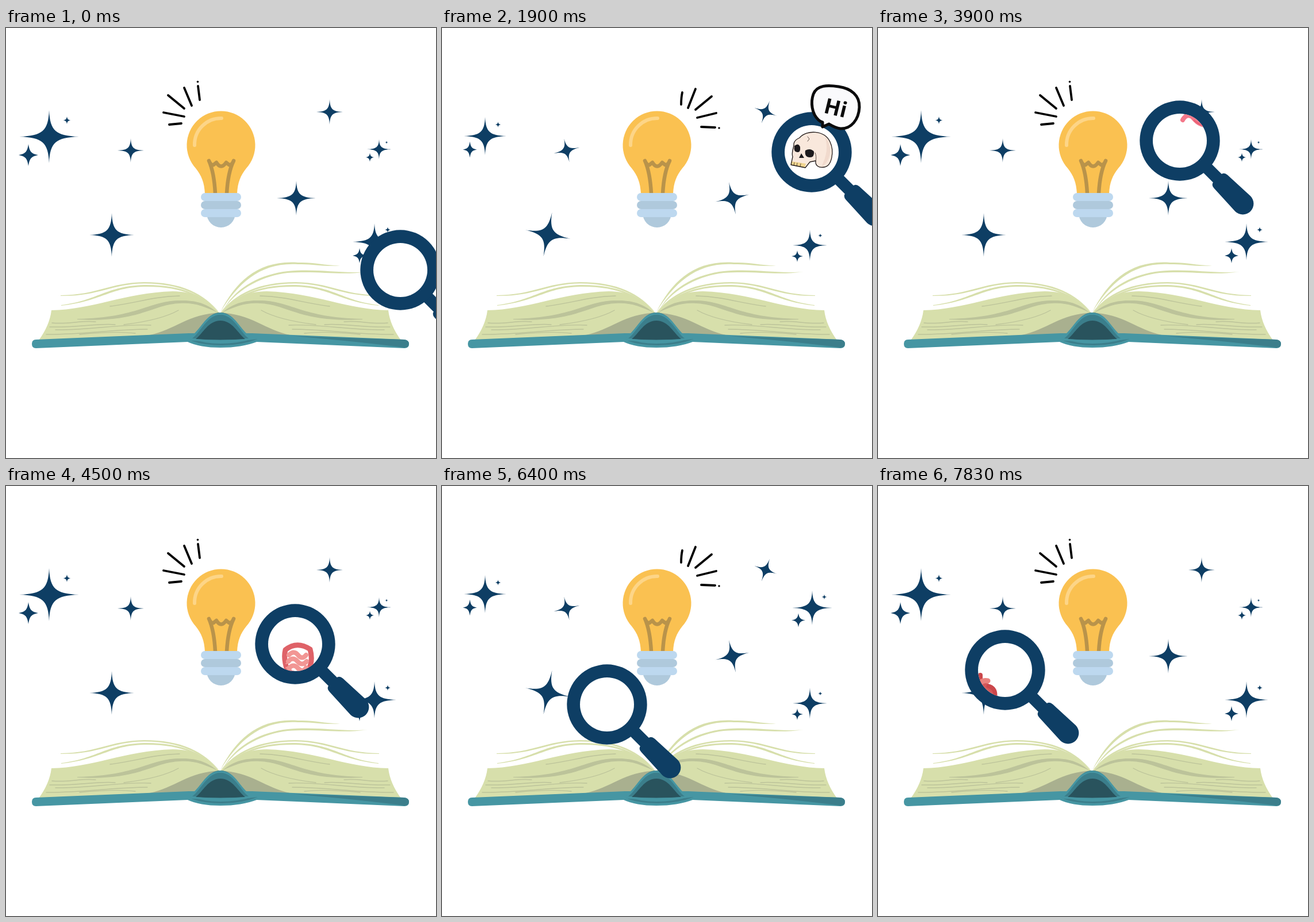
An HTML page with a canvas for the animation above (8000 ms loop, 748 px wide and 748 px high).

```html
<!DOCTYPE html>
<html lang="en">
<head>
<meta charset="utf-8">
<title>Open book and magnifying glass</title>
<style>
  html, body { margin: 0; width: 100%; height: 100%; overflow: hidden; background: #fff; }
  canvas { display: block; width: 748px; height: 748px; }
</style>
</head>
<body>
<canvas id="stage" width="748" height="748"></canvas>
<script>
const ctx = document.getElementById('stage').getContext('2d');
const LOOP = 8000;
const NAVY = '#0e3e64', PAGE = '#d7dfab', PAGE_LINE = '#bcc39a', FOLD = '#a9b08f';
const TEAL = '#4696a3', TEAL_DARK = '#3b7e8b', TEAL_DEEP = '#29535d';

// Each step: start time, lens centre x and y. The two star poses alternate per step.
const steps = [
  [0, 686, 421], [300, 668, 432], [530, 655, 373], [830, 650, 335], [1070, 648, 291],
  [1370, 645, 250], [1630, 643, 216], [1900, 643, 216], [2170, 645, 190], [2470, 638, 146],
  [2730, 622, 110], [3000, 599, 104], [3300, 567, 145], [3600, 567, 145], [3900, 525, 196],
  [4200, 510, 238], [4500, 503, 275], [4800, 503, 304], [5070, 495, 313], [5330, 457, 344],
  [5570, 412, 351], [5870, 366, 372], [6130, 325, 384], [6400, 287, 380], [6700, 235, 406],
  [6970, 185, 363], [7270, 185, 363], [7530, 185, 363], [7830, 221, 320]
];
const BUBBLE_TIME = 1900;

function fill(d, color) {
  ctx.fillStyle = color;
  ctx.fill(new Path2D(d));
}

function line(d, color, width) {
  ctx.strokeStyle = color;
  ctx.lineWidth = width;
  ctx.lineCap = ctx.lineJoin = 'round';
  ctx.stroke(new Path2D(d));
}

function disc(x, y, r, color) {
  ctx.fillStyle = color;
  ctx.beginPath();
  ctx.arc(x, y, r, 0, Math.PI * 2);
  ctx.fill();
}

function bar(x, y, w, h, r, color) {
  ctx.fillStyle = color;
  ctx.beginPath();
  ctx.roundRect(x, y, w, h, r);
  ctx.fill();
}

// Small stars are plump, large ones have needle-thin points.
function star(x, y, w, h = w, degrees = 0) {
  const [near, far] = w < 20 ? [.12, .3] : [.03, .22];
  ctx.save();
  ctx.translate(x, y);
  ctx.rotate(degrees * Math.PI / 180);
  ctx.scale(w, h);
  ctx.beginPath();
  ctx.moveTo(0, -1);
  for (let i = 0; i < 4; i++) {
    ctx.bezierCurveTo(near, -far, far, -near, 1, 0);
    ctx.rotate(Math.PI / 2);
  }
  ctx.fillStyle = NAVY;
  ctx.fill();
  ctx.restore();
}

function drawStars(tilted) {
  if (tilted) {
    star(75, 188, 37, 33); star(48.5, 211.5, 12, 14); star(97.5, 168, 5);
    star(217, 213, 23, 21, -13); star(184, 359, 40, 39, 11);
    star(505, 296, 30, 29, -12); star(563, 146, 21, 21, 20);
    star(644, 212, 35, 30); star(620, 233.5, 12); star(665, 193, 4.5);
    star(640, 378, 30, 27); star(618, 397, 10); star(658, 361, 3.5);
  } else {
    star(75, 189, 52, 46); star(39, 221, 17, 19); star(106, 160.5, 6.5);
    star(217, 213, 23, 21); star(184, 360, 39, 38);
    star(505, 296, 34, 30); star(563, 146, 23, 22);
    star(649, 211, 21, 17.5); star(633, 225, 7.5); star(662, 199, 2.5);
    star(641, 372, 38, 32); star(615, 396, 12, 13); star(664, 351, 5);
  }
}

function drawRays(right) {
  line(right
    ? 'M418 112Q416 121 416 133M441 106L428 139M469 119L441 142M477 148L444 156M451 172L475 173'
    : 'M282 117L310 140M310 104L323 135M334 101L337 125M274 147L310 154M284 168L305 166', '#000', 3.8);
  if (right) disc(482, 174, 1.7, '#000');
  else disc(333.5, 93.5, 1.8, '#000');
}

function drawBulb() {
  fill('M346 288C345 268 340 257 330 244A59.5 59.5 0 1 1 418 244C408 257 403 268 402 288Z', '#fac151');
  line('M328 204A46 46 0 0 1 375 157', '#fdd587', 6);
  line('M353 231Q362 251 364 288M396 231Q386 251 384 288M353 231Q357 240 361 238L366 234' +
    'Q374 247 383 234L388 238Q393 239 396 231', '#b9934a', 6.5);
  disc(374, 322, 25, '#afc9dc');
  bar(339, 287, 70, 14, 7, '#bdd8ef');
  bar(339, 301, 70, 14, 7, '#afc9dc');
  bar(339, 315, 70, 14, 7, '#bdd8ef');
}

function drawHalfBook() {
  fill('M79 491C150 490 205 461 290 458C328 458 350 472 373 498L373 532L310 536L57 543Q76 517 79 491Z', PAGE);
  fill('M250 534C292 526 317 497 373 495L330 533Z', FOLD);
  fill('M95 465C160 464 180 443 240 442C305 442 345 462 372 496C343 465 302 444 240 444.5C183 445 162 467 95 466Z', PAGE);
  fill('M96 482C160 474 174 449 240 447C306 446 347 466 372 497C344 468 306 449 240 450C182 451 164 476 96 483Z', PAGE);
  fill('M124 506C230 504 250 474 303 474C335 473 352 482 368 495C345 484 326 477 302 479C254 481 232 513 124 507Z', PAGE_LINE);
  line('M181 484C220 480 255 467 302 466M80 513C110 516 130 508 156 511M76 520C130 521 162 513 190 516' +
    'M86 525C145 526 205 514 252 517M70 533C130 534 186 524 246 524M128 533Q190 527 225 531' +
    'M205 516Q270 508 300 491', PAGE_LINE, 1.4);
}

function drawBook() {
  drawHalfBook();
  ctx.save();
  ctx.translate(744, 0);
  ctx.scale(-1, 1);
  drawHalfBook();
  ctx.restore();
  fill('M373 494C400 440 440 403 508 408C535 407 552 413 581 413C552 416 535 410 508 411C444 407 405 442 373 494Z', PAGE);
  fill('M378 490C402 448 446 428 490 423C545 418 580 428 629 424C580 431 545 422 490 426C449 431 406 450 378 490Z', PAGE);

  fill('M52 542L318 531L428 531L693 542Q701 543 701 549.5Q701 557 693 557L436 546' +
    'Q410 556 373 556Q337 556 316 546L52 557Q45 557 45 549.5Q45 542 52 542Z', TEAL);
  fill('M500 536L693 542Q701 543 701 550Q700 557 692 556Q620 546 500 536Z', TEAL_DARK);
  fill('M318 541C338 529 346 495 373 495C400 495 408 529 428 541Q400 548 373 548Q346 548 318 541Z', TEAL);
  fill('M324 540C342 527 348 495 373 495C398 495 404 527 422 540Z', TEAL_DARK);
  line('M324 537C341 523 350 498 373 497C396 498 405 523 422 537', TEAL, 3);
  fill('M330 541C342 532 352 509 373 509C394 509 404 532 416 541Q373 544 330 541Z', TEAL_DEEP);
  fill('M322 544Q345 552 376 552Q410 552 438 541Q410 545 373 545Q345 545 322 544Z', TEAL_DARK);
  fill('M320 540Q344 543 373 543Q402 543 432 540Q403 549 373 549Q345 549 320 540Z', TEAL);
}

function drawSkull() {
  const head = 'M622 191C634 177 665 177 675 198C683 215 678 240 665 242C655 244 649 239 650 231' +
    'L640 233L632 243L607 238L610 224C607 216 613 207 612 201Q613 195 622 191Z';
  fill(head, '#f9e8dc');
  fill('M666 189C682 206 675 235 660 241C669 224 672 206 666 189Z', '#f1dacd');
  fill('M608 232L633 236L631 243L607 238Z', '#f1d58f');
  line(head, '#211a19', 1.3);
  line('M613 234L612 239M618 235L617 240M624 236L623 241M650 232Q652 223 649 217' +
    'M636 189L639 193L636 197', '#3a2c29', .8);
  fill('M613 205Q620 199 623 207Q624 217 618 216Q611 216 613 205Z', '#1d1b1d');
  fill('M632 213Q641 208 647 215Q648 225 640 225Q630 225 632 213Z', '#1d1b1d');
  fill('M625 218L630 226L621 226Z', '#1d1b1d');
}

function drawStomach() {
  line('M570 109C564 119 572 125 579 132', '#f4788a', 9);
  fill('M571 124C582 115 605 118 605 139C606 161 590 175 570 173C555 172 548 162 541 154' +
    'C550 144 560 154 570 147C577 141 574 133 571 124Z', '#f4788a');
  line('M530 160Q537 147 549 156', '#f4788a', 8);
  line('M550 161Q561 171 574 169Q594 166 600 145', '#eb6377', 3);
}

function drawIntestine() {
  line('M486 285Q506 269 529 284Q535 306 525 321Q506 332 490 322Q482 301 486 285', '#df6268', 9);
  line('M492 294Q501 285 508 294T522 294M491 305Q499 296 507 305T523 305M492 317Q500 308 508 317T522 316', '#f29694', 8);
  line('M487 309L494 307M487 316L495 314M490 323L496 319', '#f29694', 2);
}

function drawHeart() {
  line('M178 344L178 329M169 347L167 333', '#cb474b', 8);
  fill('M160 347C173 333 190 340 198 349C211 360 210 380 188 399C166 390 153 363 160 347Z', '#d4585a');
  line('M173 352Q178 336 191 339', '#e9827e', 9);
  line('M192 348Q204 351 204 364', '#cb474b', 7);
  line('M182 358Q198 363 189 391M187 371L198 375M169 354Q167 372 180 384', '#f0a09a', 2.2);
}

function drawMagnifier(x, y) {
  ctx.save();
  ctx.translate(x, y);
  ctx.rotate(Math.PI / 4);
  bar(62, -10.5, 40, 21, 0, NAVY);
  fill('M101 -16.5L155 -18.8A18.8 18.8 0 0 1 155 18.8L101 16.5Q92 16 92 8L92 -8Q92 -16 101 -16.5Z', NAVY);
  ctx.restore();
  disc(x, y, 69.7, NAVY);
  disc(x, y, 47, '#fff');
  // Hidden things only show through the glass.
  ctx.save();
  ctx.beginPath();
  ctx.arc(x, y, 47, 0, Math.PI * 2);
  ctx.clip();
  drawSkull();
  drawStomach();
  drawIntestine();
  drawHeart();
  ctx.restore();
}

function drawBubble() {
  const outline = 'M655 160C643 149 641 129 646 115C652 99 671 99 690 102C711 105 727 117 726 138' +
    'C725 159 712 176 693 175C684 174 678 170 673 167L662 172L662 164Q658 163 655 160Z';
  fill(outline, '#fafafc');
  line(outline, '#0b0b0c', 5);
  ctx.save();
  ctx.translate(685, 138);
  ctx.rotate(.24);
  ctx.font = '700 37px "Open Sans", sans-serif';
  ctx.textAlign = 'center';
  ctx.textBaseline = 'alphabetic';
  ctx.fillStyle = '#0b0b0c';
  ctx.fillText('Hi', 0, 14);
  ctx.restore();
}

function draw() {
  const time = performance.now() % LOOP;
  const index = steps.findLastIndex(([start]) => start <= time);
  const [start, x, y] = steps[index];
  const odd = index % 2 === 1;
  ctx.fillStyle = '#fff';
  ctx.fillRect(0, 0, 748, 748);
  drawStars(odd);
  drawRays(odd);
  drawBulb();
  drawBook();
  drawMagnifier(x, y);
  if (start === BUBBLE_TIME) drawBubble();
  requestAnimationFrame(draw);
}
draw();
</script>
</body>
</html>
```
